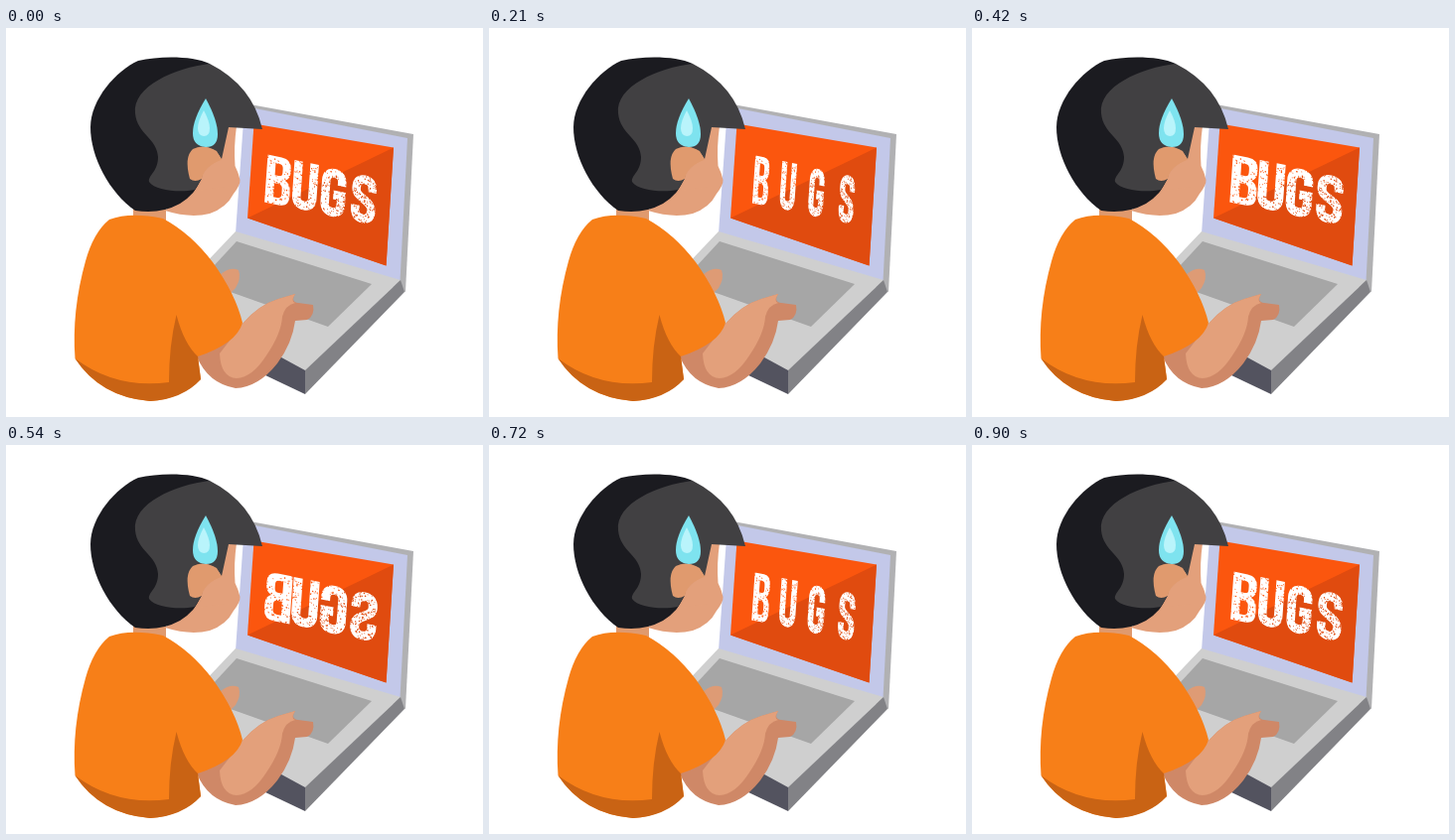
Write an HTML page that moves like this. It is 480 px wide and 392 px high and loops after 1050 ms.

```html
<!DOCTYPE html>
<html lang="en">
<head>
<meta charset="utf-8">
<title>Bugs</title>
<style>
html, body { margin: 0; width: 100%; height: 100%; overflow: hidden; background: #fff; }
svg { display: block; width: 100%; height: 100%; }
</style>
</head>
<body>
<svg viewBox="0 0 480 392">
  <!-- laptop lid -->
  <path fill="#b1b1b3" d="M240 76L410 107 402 266 390 262Z"/>
  <path fill="#c3c8e9" d="M240 79L404 111 396.500 255 231 207Z"/>
  <path fill="#fb560e" d="M249.500 96.500L390 120.500 382.500 239.500 243 191.500Z"/>
  <path fill="#e04b0f" d="M390 120.500L382.500 239.500 243 191.500Z"/>
  <g id="word" role="img" aria-label="BUGS" fill="#fff" fill-rule="evenodd"></g>

  <!-- laptop base -->
  <path fill="#cfcfcf" d="M231 205L397 254 301 346 190 290 195 243Z"/>
  <path fill="#a6a6a6" d="M232 215L368 258 324 301 195 255Z"/>
  <path fill="#828286" d="M397 254L401 266 301 369V345Z"/>
  <path fill="#53535f" d="M301 345V369L240 340 268 327Z"/>

  <!-- arms -->
  <path fill="#de9b75" d="M216 248Q226 240 234 244 237 252 231 262L226 267Z"/>
  <path fill="#cf8867" d="M190 330L238 298Q254 279 274 273L291 268Q286 276 294 277L309 279Q311 290 303 294L291 295Q288 318 273 338 254 362 231 363 203 358 192 331Z"/>
  <path fill="#e3a07b" d="M238 298Q254 279 274 273L291 268Q286 276 291 277 281 279 278 291 277 308 262 330 248 352 232 353 216 352 215 328Z"/>

  <!-- head -->
  <path fill="#e09a6e" d="M128 176H161V198H128Z"/>
  <path fill="#e3a07b" d="M160 184Q185 192 205 187 222 181 229 167 236 158 235.500 153 234 146 230.500 139 229 120 232 99L222 97 190 121 180 165Z"/>
  <path fill="#1b1b20" d="M205 36C188 28 155 28 133 33 111 43 85 72 85 100 85 130 104 166 130 184Q155 188 175 177 190 168 197 152L205 60Z"/>
  <path fill="#414042" d="M205 36C170 40 127 59 130 86 132 107 152 111 153 130 153 145 143 148 144 155 150 164 175 166 190 163L197 152 184 148 190 121Q208 116 217 132L224 100 258 102Q248 58 205 36Z"/>
  <path fill="#e09a6e" d="M185 152Q179 130 188 122 198 116 212 124L217 133Q200 139 197 152 190 156 185 152Z"/>
  <path fill="#e3a07b" d="M197 152Q200 139 217 133L224 130V160L190 164Z"/>
  <path fill="#7ee3ef" d="M201 71Q213 93 213 107 213 120 201 120 188 119 188 106 188 92 201 71Z"/>
  <path fill="#b9f4fb" d="M199 83Q205 94 205 101 205 109 199 109 193 108 193 101 193 94 199 83Z"/>

  <!-- shirt -->
  <path fill="#f77f18" d="M104 193Q125 185 158 192 186 207 208 236 231 268 238 297 232 318 193 331L196 354Q175 374 145 376 95 372 69.500 333 66 285 80 235 88 206 104 193Z"/>
  <path fill="#c96314" d="M171.500 289Q164 320 164 357 110 364 69.500 333 95 372 145 376 178 374 196 354L193 331Q179 318 171.500 289Z"/>
</svg>
<script>
const word = document.getElementById('word');

// Letter outlines around their own centre; "line" letters are strokes.
const letters = [
  { x: 274, y: 154, d: 'M-13-24h15q10.5 0 10.5 10v4q0 6-5.5 8.5q6 2.5 6 9.5v6q0 10-11 10h-15zM-4-17v12h4q4 0 4-4v-4q0-4-4-4zM-4 3v14h4q4.5 0 4.5-4v-6q0-4-4.5-4z' },
  { x: 301, y: 159.5, line: true, d: 'M-8.5-24V11q0 8.5 8.5 8.5t8.5-8.5V-24' },
  { x: 329.5, y: 166, line: true, d: 'M8.5-8v-3q0-8.5-8.5-8.5t-8.5 8.5v22q0 8.5 8.5 8.5t8.5-8.5V2H0' },
  { x: 360, y: 172.5, line: true, d: 'M8.5-8v-3q0-8.5-8.5-8.5t-8.5 8.5v2q0 5 8.5 9t8.5 10v1q0 8.5-8.5 8.5t-8.5-8.5v-4' }
];

let seed = 7;
const rand = () => (seed = seed * 16807 % 2147483647) / 2147483647;

// Round specks, denser toward the right and the bottom.
function specks(count, size) {
  let d = '';
  for (let i = 0; i < count; i++) {
    const x = 13 - 26 * rand() ** 1.4, y = 24 - 48 * rand() ** 1.2;
    d += `M${x.toFixed(1)} ${y.toFixed(1)}h.01`;
  }
  return `<path d="${d}" stroke="#000" stroke-width="${size}" stroke-linecap="round"/>`;
}

word.innerHTML = letters.map((l, i) => `
  <mask id="worn${i}" maskUnits="userSpaceOnUse" x="-16" y="-27" width="32" height="54">
    <path fill="#fff" d="M-16-27h32v54h-32z"/>${specks(70 + 30 * i, 0.9)}${specks(25 + 12 * i, 1.5)}
  </mask>
  <g transform="matrix(1 .2 -.07 1 ${l.x} ${l.y})"><g class="spin">
    <path mask="url(#worn${i})" d="${l.d}" ${l.line ? 'fill="none" stroke="#fff" stroke-width="9"' : ''}/>
  </g></g>`).join('');
const spins = word.querySelectorAll('.spin');

// time (ms), angle (deg), speed (deg/ms)
const keys = [
  [0, -20, 0], [210, 55, 0.65], [420, 358, 1.9], [540, 540, 1.1],
  [630, 614, 0.7], [780, 690, 0.22], [900, 700, 0]
];

function angleAt(t) {
  const i = keys.findIndex(k => k[0] > t);
  if (i < 0) return 700;
  const [t0, a, va] = keys[i - 1], [t1, b, vb] = keys[i];
  const h = t1 - t0, u = (t - t0) / h, w = 1 - u;
  return a * w * w * (1 + 2 * u) + b * u * u * (3 - 2 * u) + h * u * w * (va * w - vb * u);
}

function draw(now) {
  const t = Math.floor(now % 1050 / 30) * 30;
  const c = Math.cos(angleAt(t) * Math.PI / 180);
  spins.forEach(s => s.setAttribute('transform', `scale(${c.toFixed(4)} 1)`));
  requestAnimationFrame(draw);
}
draw(0);
</script>
</body>
</html>
```
